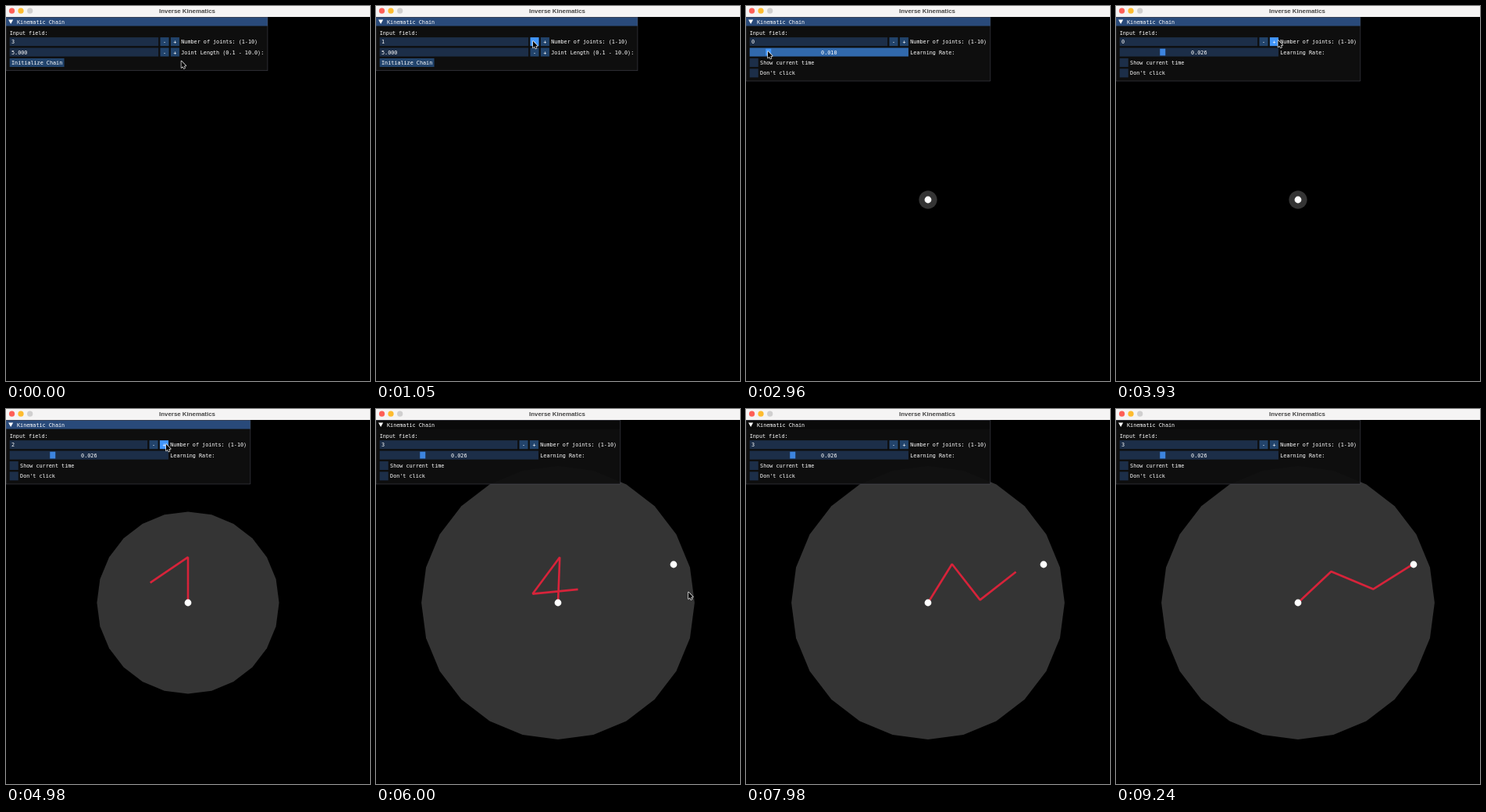
An HTML page with a canvas for the animation above (9.3 s loop, 466x480 px).

```html
<!DOCTYPE html>
<html lang="en">
<head>
<meta charset="utf-8">
<title>Inverse Kinematics</title>
<style>
  html, body { margin: 0; width: 100%; height: 100%; overflow: hidden; background: #000; }
  canvas { display: block; }
</style>
</head>
<body>
<canvas id="stage" width="466" height="480"></canvas>
<script>
const ctx = document.getElementById('stage').getContext('2d');
const LOOP = 9300, SCALE = 0.5825, TOP = 14.5;
const BASE = { x: 233, y: 248 }, LINK = 58.3, REACH = { x: 148, y: 49 };
const INIT = 1925, SOLVE = 5697, CURSOR_GONE = 7500;
const MINUS_CLICKS = [730, 1050, 1370], PLUS_CLICKS = [4060, 4620, 5220];
const DRAG = [2960, 3350];
const RATE = 0.0243, STEP = 1 / 120;
const COLORS = {
  frame: 'rgba(41,74,122,.54)', frameHover: 'rgba(66,150,250,.4)', frameActive: 'rgba(66,150,250,.67)',
  button: 'rgba(66,150,250,.4)', buttonHover: '#4296fa', grab: '#3d85e0', grabActive: '#4296fa'
};

// time, x, y of the pointer tip
const POINTER = [
  [0, 224.5, 70.5], [60, 224.5, 70.5], [700, 201, 45], [1390, 201, 45], [1670, 27, 74.5],
  [2000, 27, 74.5], [2700, 28, 58], [2960, 28, 58], [3350, 59, 58], [3400, 59, 58],
  [3870, 207.5, 44], [4180, 207.5, 44], [4440, 205, 45], [5280, 205, 45],
  [5640, 381, 199], [5720, 381, 199], [6000, 400, 234.5]
];

const clamp01 = v => Math.max(0, Math.min(1, v));
const smooth = v => v * v * (3 - 2 * v);
const countBefore = (times, t) => times.filter(c => t >= c).length;

function pointerAt(t) {
  let i = 0;
  while (i < POINTER.length - 2 && t >= POINTER[i + 1][0]) i++;
  const [t0, x0, y0] = POINTER[i], [t1, x1, y1] = POINTER[i + 1];
  const k = smooth(clamp01((t - t0) / (t1 - t0)));
  return { x: x0 + (x1 - x0) * k, y: y0 + (y1 - y0) * k };
}

// Joint positions relative to the base, y up.
function chain(angles) {
  const points = [{ x: 0, y: 0 }];
  let a = 0;
  for (const turn of angles) {
    a += turn;
    const p = points[points.length - 1];
    points.push({ x: p.x + LINK * Math.cos(a), y: p.y + LINK * Math.sin(a) });
  }
  return points;
}

// Gradient descent on the distance between the chain's end and its goal.
function solve(seconds) {
  const angles = [90, 124, 122].map(d => d * Math.PI / 180);
  for (let s = 0; s < seconds; s += STEP) {
    const points = chain(angles), end = points[3];
    const dx = REACH.x - end.x, dy = REACH.y - end.y, dist = Math.hypot(dx, dy);
    if (dist < 0.6) break;
    for (let i = 0; i < 3; i++) {
      const slope = ((end.x - points[i].x) * dy - (end.y - points[i].y) * dx) / dist;
      angles[i] += RATE * STEP * slope;
    }
  }
  return angles;
}

function rect(x, y, w, h, color) {
  ctx.fillStyle = color;
  ctx.fillRect(x, y, w, h);
}

function disc(x, y, r, color) {
  ctx.fillStyle = color;
  ctx.beginPath();
  ctx.arc(x, y, r, 0, 2 * Math.PI);
  ctx.fill();
}

function shape(points, color) {
  ctx.fillStyle = color;
  ctx.beginPath();
  points.forEach(([x, y]) => ctx.lineTo(x, y));
  ctx.closePath();
  ctx.fill();
}

function label(text, x, rowTop, align = 'left') {
  ctx.font = '11.63px "DejaVu Sans Mono", monospace';
  ctx.textAlign = align;
  ctx.fillStyle = '#fff';
  ctx.fillText(text, x, rowTop + 14);
}

function drawScene(t) {
  const joints = countBefore(PLUS_CLICKS, t);
  const radius = joints ? joints * LINK : LINK / 5;
  const corners = Array.from({ length: 24 }, (_, i) => {
    const a = i * Math.PI / 12;
    return [BASE.x + radius * Math.cos(a), BASE.y + radius * Math.sin(a)];
  });
  shape(corners, '#343434');

  const angles = solve((t - SOLVE) / 1000).slice(0, joints);
  ctx.strokeStyle = '#d7233a';
  ctx.lineWidth = 2.6;
  ctx.lineJoin = 'bevel';
  ctx.beginPath();
  chain(angles).forEach(p => ctx.lineTo(BASE.x + p.x, BASE.y - p.y));
  ctx.stroke();

  disc(BASE.x, BASE.y, 4.4, '#fff');
  if (t >= SOLVE) disc(BASE.x + REACH.x, BASE.y - REACH.y, 4.4, '#fff');
}

function drawPanel(t, pointer) {
  const ready = t >= INIT;
  const width = ready ? 537 + 40 * 0.65 ** ((t - INIT) / 16.7) : 575;
  const height = ready ? 140 : 117;
  const right = 8 + Math.floor(width * 0.65);
  const dragging = t >= DRAG[0] && t < DRAG[1];
  const mx = pointer.x / SCALE, my = (pointer.y - TOP) / SCALE;
  const over = (x, y, w) => mx >= x && mx < x + w && my >= y && my < y + 19;

  const button = (text, x, y, w) => {
    rect(x, y, w, 19, over(x, y, w) ? COLORS.buttonHover : COLORS.button);
    label(text, x + w / 2, y, 'center');
  };
  const field = (x, y, w, hoverWidth = w) =>
    rect(x, y, w, 19, over(x, y, hoverWidth) ? COLORS.frameHover : COLORS.frame);
  const stepper = (value, y, caption) => {
    rect(8, y, right - 54, 19, COLORS.frame);
    label(value, 12, y);
    button('-', right - 42, y, 19);
    button('+', right - 19, y, 19);
    label(caption, right + 4, y);
  };
  const checkbox = (caption, y) => {
    field(8, y, 19, 23 + caption.length * 7);
    label(caption, 31, y);
  };

  ctx.save();
  ctx.translate(0, TOP);
  ctx.scale(SCALE, SCALE);
  rect(0, 0, width, height, 'rgba(15,15,15,.94)');
  rect(0, 0, width, 19, t < SOLVE ? '#294a7a' : '#0a0a0a');
  ctx.strokeStyle = 'rgba(110,110,128,.5)';
  ctx.lineWidth = 1.2;
  ctx.strokeRect(0, 0, width, height);
  shape([[5.3, 5], [15.7, 5], [10.5, 14.5]], '#fff');
  label('Kinematic Chain', 24, 0);
  label('Input field:', 8, 24);

  const joints = ready ? countBefore(PLUS_CLICKS, t) : 3 - countBefore(MINUS_CLICKS, t);
  stepper(String(joints), 44, 'Number of joints: (1-10)');
  if (ready) {
    const rate = 0.01 + 0.016 * smooth(clamp01((t - DRAG[0]) / (DRAG[1] - DRAG[0])));
    const span = right - 8;
    if (dragging) rect(8, 67, span, 19, COLORS.frameActive);
    else field(8, 67, span);
    rect(10 + rate * 10 * (span - 16), 69, 12, 15, dragging ? COLORS.grabActive : COLORS.grab);
    label(rate.toFixed(3), 8 + span / 2, 67, 'center');
    label('Learning Rate:', right + 4, 67);
    checkbox('Show current time', 90);
    checkbox("Don't click", 113);
  } else {
    stepper('5.000', 67, 'Joint Length (0.1 - 10.0):');
    button('Initialize Chain', 8, 90, 120);
  }
  ctx.restore();
}

function drawTitleBar() {
  rect(0, 0, 466, 14, '#f5f4f4');
  disc(7.5, 6.2, 3.6, '#fe5f57');
  disc(19, 6.2, 3.6, '#febc2e');
  disc(30.7, 6.2, 3.6, '#d0cfcf');
  ctx.font = 'bold 7.9px "Liberation Sans", sans-serif';
  ctx.textAlign = 'center';
  ctx.fillStyle = '#444';
  ctx.fillText('Inverse Kinematics', 232, 9);
}

function drawPointer({ x, y }) {
  ctx.save();
  ctx.translate(x, y);
  ctx.strokeStyle = '#e8e8e8';
  ctx.lineWidth = 1.5;
  ctx.lineJoin = 'round';
  const arrow = [[0, 0], [0, 8.4], [1.9, 6.7], [3.2, 9.5], [4.5, 8.9], [3.3, 6.2], [5.8, 6]];
  ctx.beginPath();
  arrow.forEach(([px, py]) => ctx.lineTo(px, py));
  ctx.closePath();
  ctx.stroke();
  shape(arrow, '#000');
  ctx.restore();
}

function draw(time) {
  const t = time < 4440 ? time : Math.floor(time / 60) * 60;
  const pointer = pointerAt(t);
  rect(0, 0, 466, 480, '#000');
  if (t >= INIT) drawScene(t);
  drawPanel(t, pointer);
  drawTitleBar();
  if (t < CURSOR_GONE) drawPointer(pointer);
}

const start = performance.now();
function tick() {
  draw((performance.now() - start) % LOOP);
  requestAnimationFrame(tick);
}
tick();
</script>
</body>
</html>
```
